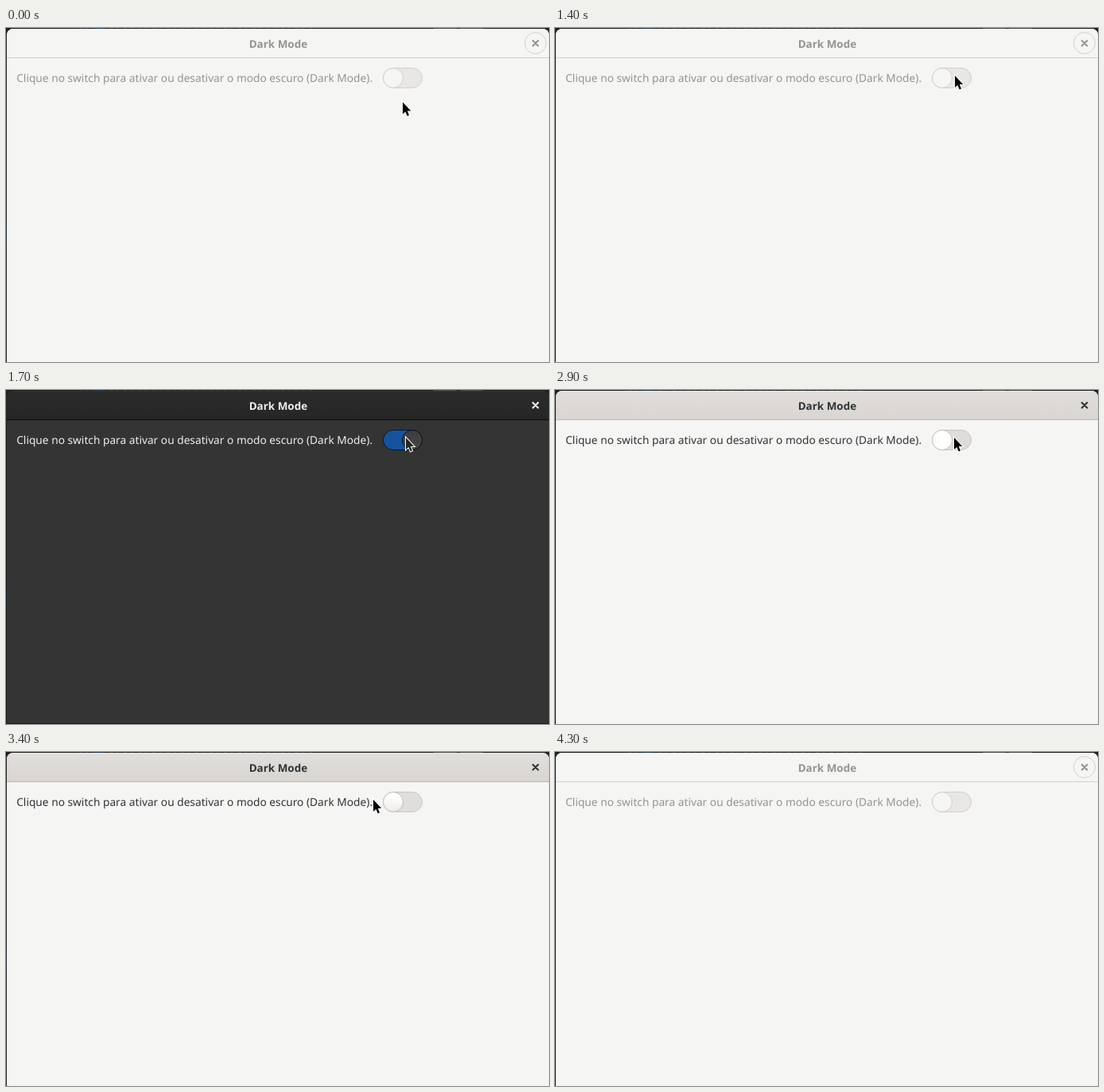
An HTML page that plays this animation: 683 by 421 pixels, repeating every 4.4 s.

```html
<!DOCTYPE html>
<html lang="pt">
<head>
<meta charset="utf-8">
<title>Dark Mode</title>
<style>
  html, body { margin: 0; width: 100%; height: 100%; overflow: hidden; background: #1f1f1f; }
  svg { display: block; width: 683px; height: 421px; }
  text { font: 13.72px "Noto Sans", "Open Sans", sans-serif; fill: var(--text); text-rendering: geometricPrecision; }
  .title { font-size: 13.45px; font-weight: 700; text-anchor: middle; }

  .idle {
    --bg: #f5f5f3; --head: #f5f5f3; --shine: #f8f8f7; --line: #d5d0cc; --text: #929595;
    --trough: #e9e7e4; --edge: #d3cec9; --knob: #f5f5f3; --knobEdge: #d3cec9; --ring: #d5d0cc;
    --arrow: #000;
  }
  .light {
    --bg: #f5f5f3; --head: url(#lightHead); --shine: #efedec; --line: #bfb8b1; --text: #2e3436;
    --trough: #e0dedb; --edge: #cdc7c2; --knob: url(#lightKnob); --knobEdge: #c4beb8; --ring: none;
    --arrow: #000;
  }
  .light.hover { --knob: #fff; --trough: #dedbda; }
  .dark {
    --bg: #343434; --head: url(#darkHead); --shine: #353535; --line: #0b0b0b; --text: #eeeeec;
    --trough: #15539e; --edge: #07182c; --knob: url(#darkKnob); --knobEdge: #07121f; --ring: none;
    --arrow: #262626;
  }
  #frame { display: none; }
  .dark #frame { display: inline; }
</style>
</head>
<body>
<svg id="stage" class="idle" viewBox="0 0 683 421">
  <defs>
    <linearGradient id="lightHead" x2="0" y2="1"><stop stop-color="#e1dedb"/><stop offset="1" stop-color="#d9d5d1"/></linearGradient>
    <linearGradient id="darkHead" x2="0" y2="1"><stop stop-color="#2b2b2b"/><stop offset="1" stop-color="#262626"/></linearGradient>
    <linearGradient id="lightKnob" x2="0" y2="1"><stop offset=".2" stop-color="#fff"/><stop offset="1" stop-color="#edebe9"/></linearGradient>
    <linearGradient id="darkKnob" x2="0" y2="1"><stop stop-color="#3d3d3d"/><stop offset="1" stop-color="#464646"/></linearGradient>
  </defs>

  <!-- desktop showing past the window edges -->
  <rect width="683" height="421" fill="#1f1f1f"/>
  <path d="M92 .5h18M130 .5h258" stroke="#363636" stroke-dasharray="4 5 2 7"/>
  <path d="M538 .5h29M571 .5h29" stroke="#4c4c4c"/>
  <path d="M110 .5h14" stroke="#183552"/>
  <path d="M.5 250v23" stroke="#122433"/>

  <!-- window -->
  <path d="M1 421V9a8 8 0 0 1 8-8H675a8 8 0 0 1 8 8V421z" fill="var(--bg)"/>
  <path d="M1 37V9a8 8 0 0 1 8-8H675a8 8 0 0 1 8 8V37z" fill="var(--head)"/>
  <path d="M8 1.5H676" stroke="var(--shine)"/>
  <path d="M1 37.5H683" stroke="var(--line)"/>
  <path id="frame" d="M1 420.5H683" stroke="#1b1b1b"/>
  <text class="title" x="342.4" y="24.7">Dark Mode</text>
  <circle cx="666" cy="19" r="13.5" fill="none" stroke="var(--ring)"/>
  <path d="M662.7 15.9l6.6 6.6m0-6.6l-6.6 6.6" stroke="var(--text)" stroke-width="2.1" stroke-linecap="round"/>
  <text x="13.2" y="68">Clique no switch para ativar ou desativar o modo escuro (Dark Mode).</text>

  <!-- switch -->
  <rect x="474.5" y="50.5" width="49" height="25" rx="12.5" fill="var(--trough)" stroke="var(--edge)"/>
  <circle id="knob" cx="487" cy="63" r="12.5" fill="var(--knob)" stroke="var(--knobEdge)"/>

  <path id="cursor" d="M0 0V15L3.4 11.9 5.7 17.4 8 16.4 5.8 11.1H10.3z" fill="var(--arrow)" stroke="#fff" paint-order="stroke" stroke-width="2"/>
</svg>
<script>
const LOOP = 4400;
// [time, x, y] of the pointer tip; it jumps at each time
const moves = [
  [0, 499, 93.5], [800, 500, 92.5], [900, 501, 92],
  [1100, 502, 83], [1200, 504, 73], [1300, 505, 64], [1400, 503, 60],
  [2000, 502, 60], [3400, 462, 60], [3500, -40, 60]
];
const themes = [
  [0, "idle"], [1700, "dark"], [2900, "light hover"], [3400, "light"], [4300, "idle"]
];
const [stage, knob, cursor] = ["stage", "knob", "cursor"].map(id => document.getElementById(id));
const at = (list, t) => list.findLast(step => step[0] <= t);

function draw(t) {
  const [, theme] = at(themes, t);
  const [, x, y] = at(moves, t);
  stage.setAttribute("class", theme);
  knob.setAttribute("cx", theme === "dark" ? 511 : 487);
  cursor.setAttribute("transform", `translate(${x} ${y})`);
}

const start = performance.now();
function tick() {
  draw((performance.now() - start) % LOOP);
  requestAnimationFrame(tick);
}
tick();
</script>
</body>
</html>
```
